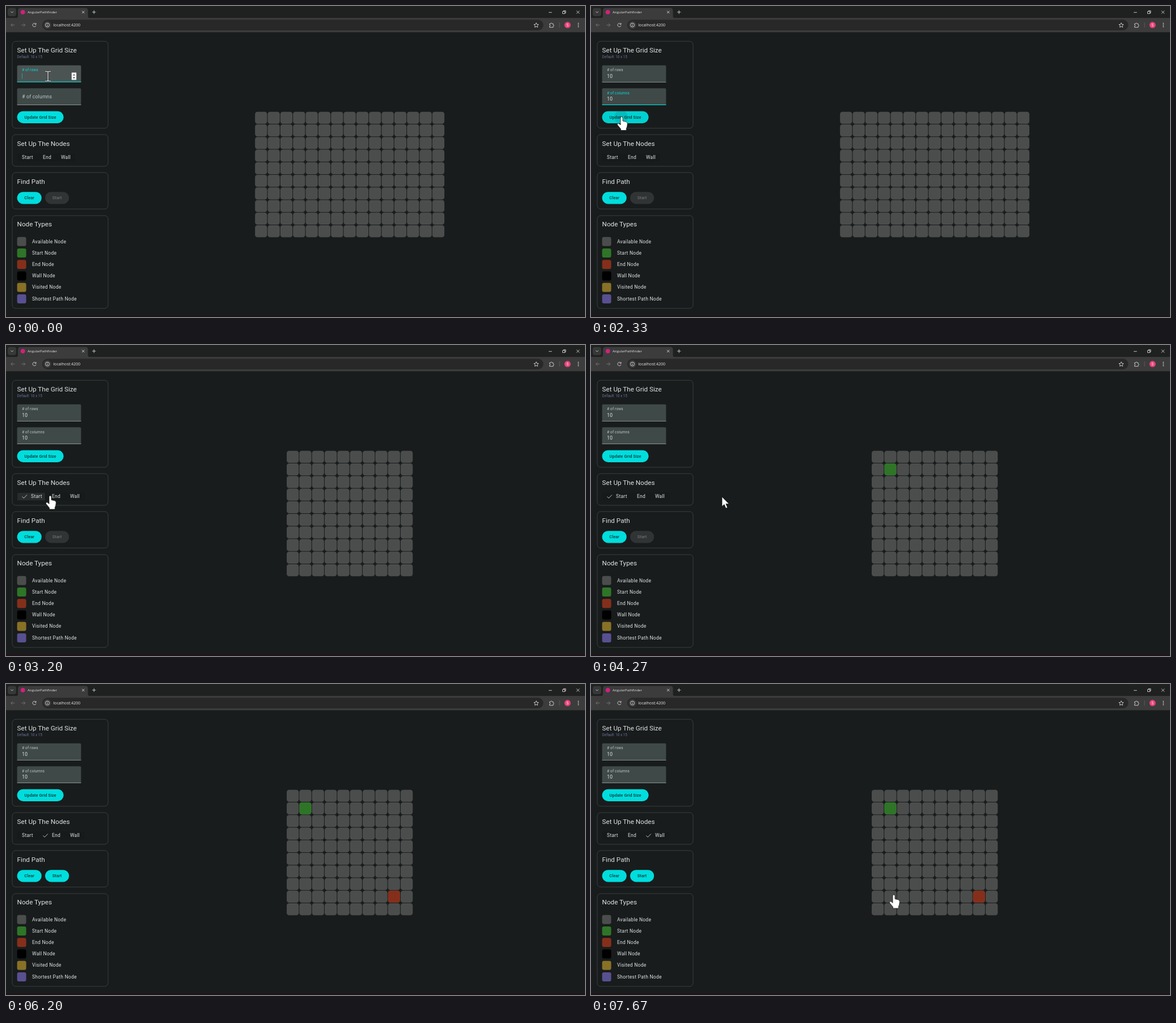
An HTML page that plays this animation: 1021x549 px, repeating every 8 s.

```html
<!DOCTYPE html>
<html lang="en">
<head>
<meta charset="utf-8">
<title>AngularPathfinder</title>
<style>
  html, body { margin: 0; width: 100%; height: 100%; overflow: hidden; background: #191c1c; }
  svg { display: block; width: 100%; height: 100%; }
  text { font-family: Roboto, sans-serif; white-space: pre; }
  .ui { font-family: "Open Sans", sans-serif; }
  .line { fill: none; stroke: #d5d5d5; stroke-width: .9; }
</style>
</head>
<body>
<svg viewBox="0 0 1021 549"><g id="page"></g><g id="live"></g></svg>
<script>
const LOOP = 8000, FPS = 15;
const PRIMARY = '#00dddd', ON_PRIMARY = '#003737', TEXT = '#dfe3e2', MUTED = '#bec9c8';
const NODE = { free: '#4b4d4c', start: '#2e7528', end: '#852f1b', wall: '#000', seen: '#887126', path: '#585090' };

const rect = (x, y, w, h, r, fill, extra = '') =>
  `<rect x="${x}" y="${y}" width="${w}" height="${h}" rx="${r}" fill="${fill}" ${extra}/>`;
const label = (x, y, s, size, fill = TEXT, extra = '') =>
  `<text x="${x}" y="${y}" font-size="${size}" fill="${fill}" ${extra}>${s}</text>`;
const path = (d, extra = 'class="line"') => `<path d="${d}" ${extra}/>`;
const spaced = 'letter-spacing=".266"';
const bold = 'font-weight="500" letter-spacing=".05" text-anchor="middle"';

function browser() {
  return rect(0, 0, 1021, 22, 0, '#1f2020') +
    rect(3, 3.5, 15, 14.5, 4, '#373838') +
    path('M8.5 9.7l2.2 2.2 2.2-2.2') +
    path('M17 21.5q4 0 4-4V8q0-4.5 4.500-4.500H140q4.500 0 4.500 4.500v9.500q0 4 4 4z', 'fill="#3c3c3c"') +
    rect(0, 21, 1021, 25.300, 0, '#3c3c3c') +
    '<circle cx="29.700" cy="10.800" r="3.900" fill="#d3207c"/>' +
    label(38, 13.2, 'AngularPathfinder', 6.1, '#e6e6e6', 'class="ui"') +
    path('M134 8.600l4.400 4.400m0-4.400l-4.400 4.400M152 10.800h6.400m-3.200-3.200v6.400') +
    path('M957 11.300h5.600M1006 8.300l5.200 5.200m0-5.200l-5.200 5.200M981.500 9.700h4v3.800h-4zM983 9.500V8.300h4v4h-1.300') +
    path('M15.300 33.600H8.800m3-3l-3 3 3 3M27.300 33.600h6.500m-3-3l3 3-3 3', 'class="line" style="stroke:#777"') +
    path('M52.600 31.800a3.100 3.100 0 1 0 .4 2.700M53 30v2.400h-2.500') +
    rect(64, 24.3, 883.500, 18.800, 9.4, '#282828') +
    '<circle cx="73" cy="33.600" r="6.600" fill="#3c3c3c"/><circle cx="73" cy="33.600" r="3.500" class="line"/>' +
    path('M73 33v2.500m0-4.200v.9') +
    label(83.3, 36.1, 'localhost:4200', 7.1, '#e8e8e8', 'class="ui"') +
    path('M935 29.700l1.200 2.700 2.900.3-2.200 2 .6 2.900-2.500-1.500-2.500 1.500.6-2.900-2.200-2 2.900-.3z') +
    path('M958.500 31.300h2a1.200 1.200 0 0 1 2.400 0h2v2a1.200 1.200 0 0 1 0 2.400v2h-6.400v-2a1.200 1.200 0 0 0 0-2.400z') +
    rect(975.6, 29, .9, 9, 0, '#5e5e5e') +
    '<circle cx="990.200" cy="33.600" r="5.500" fill="#e8417b"/>' +
    label(990.2, 35.9, 'S', 6.4, '#fff', 'text-anchor="middle"') +
    [30.6, 33.6, 36.6].map(y => `<circle cx="1009.300" cy="${y}" r=".9" fill="#ddd"/>`).join('');
}

const card = (y, h, title, dy) =>
  rect(11, y, 169, h, 6, 'none', 'stroke="#3f4847" stroke-width=".8"') + label(19.6, y + dy, title, 11.7);

function page() {
  const legend = [['Available', 'free'], ['Start', 'start'], ['End', 'end'],
    ['Wall', 'wall'], ['Visited', 'seen'], ['Shortest Path', 'path']];
  return rect(0, 0, 1021, 549, 0, '#191c1c') + browser() +
    card(62.3, 153.5, 'Set Up The Grid Size', 19.500) +
    label(19.6, 92.2, 'Default: 10 x 15', 6.4, '#69719a') +
    card(227, 56, 'Set Up The Nodes', 19.9) +
    card(294, 64.300, 'Find Path', 19.9) +
    rect(19.6, 328.2, 43.200, 21.200, 10.6, PRIMARY) +
    label(41.2, 341.2, 'Clear', 7.45, ON_PRIMARY, bold) +
    card(370, 163.800, 'Node Types', 19.400) +
    legend.map(([name, kind], i) => {
      const y = 407.8 + i * 20.22;
      return rect(19.6, y, 16, 16, 3.2, NODE[kind]) + label(46, y + 10.8, name + ' Node', 8.5, TEXT, spaced);
    }).join('') +
    rect(0, 546.3, 1021, 2.7, 0, '#201419');
}

// Pointer stops: time, x, y, shape (I beam, A arrow, H hand, - hidden)
const STOPS = `0 74 124 I|70 74 124 I|200 75 130 I|270 74 138 A|330 72 144 A|400 72 144 A|470 69 151 I
800 60 160 I|930 60 160 I|1530 55 163 I|1670 55 166 I|1800 57 176 A|1870 66 188 H|2000 74 192 H
2130 54 195 H|2530 54 196 H|2670 47 225 A|2870 46 267 H|3060 50 268 H|3200 78 266 H
3330 135 277 A|3460 240 284 A|3600 400 260 A|3800 535 228 H|3870 549 224 H|4000 534 222 H
4070 520 225 H|4130 440 240 A|4200 330 258 A|4270 231 268 A|4400 150 266 A|4530 125 266 H
4730 117 266 H|4800 117 266 H|5000 90 267 H|5130 90 267 H|5200 97 268 H|5270 180 285 A
5400 420 340 A|5530 620 378 H|5670 691 383 H|5800 688 379 H|5930 686 378 H|6070 686 378 H
6130 430 256 A|6200 430 256 -|6530 38 193 H|6670 70 235 A|6800 112 266 H|6930 114 267 H
7000 130 272 H|7130 300 315 A|7260 470 345 A|7330 526 350 H|7400 580 368 H|7470 597 374 H
7600 545 374 H|7670 534 372 H|8000 534 372 H`.split(/[|\n]/).map(s => {
  const [t, x, y, shape] = s.split(' ');
  return { t: +t, x: +x, y: +y, shape };
});
const OUTLINE = 'fill="#fff" stroke="#111" stroke-width=".7" stroke-linejoin="round"';
const BEAM = 'M-5-8.500h3.200q1.800 0 1.800 1.500V7q0 1.500-1.800 1.500H-5M5-8.500H1.800Q0-8.500 0-7V7q0 1.500 1.800 1.500H5';
const SHAPES = {
  I: path(BEAM, 'fill="none" stroke="#222" stroke-width="2.800"') + path(BEAM, 'fill="none" stroke="#d0d0d0" stroke-width="1.500"'),
  A: path('M0 0V17L4 13.500 6.800 20.200 9.700 19 6.900 12.400H12.300z', OUTLINE),
  H: path('M-2 2Q-2 0 0 0T2 2V7.500L7.500 8.700Q10.500 9.500 10.300 12.500L9.700 17Q9.300 19 8.300 20.500V24H-1.500V21.500L-7.300 14.500Q-8.300 12.800-6.800 12Q-5 11.300-3.500 13L-2 14.500z', OUTLINE),
  '-': ''
};

function pointer(t) {
  const i = STOPS.findLastIndex(s => s.t <= t), a = STOPS[i], b = STOPS[i + 1] || a;
  const k = a.shape === '-' || b.shape === '-' ? 0 : (t - a.t) / (b.t - a.t || 1);
  return `<g transform="translate(${a.x + (b.x - a.x) * k} ${a.y + (b.y - a.y) * k})">${SHAPES[a.shape]}</g>`;
}

function field(y, name, { value, focus, float, hover, caret }) {
  const mix = `color-mix(in srgb, ${PRIMARY} ${focus * 100}%, ${MUTED})`;
  const thick = focus > 0 ? 1.1 : .6;
  let out = path(`M19.600 ${y + 29.8}V${y + 2}q0-2 2-2H130.400q2 0 2 2V${y + 29.8}z`, `fill="${hover ? '#4b5453' : '#3f4948'}"`) +
    rect(19.6, y + 29.8 - thick, 112.8, thick, 0, mix) +
    `<g transform="translate(28.200 ${y + 18 - 7.7 * float}) scale(${1 - .25 * float})">${label(0, 0, name, 8.5, mix, spaced)}</g>` +
    label(28.2, y + 21.9, value, 8.5, TEXT, spaced);
  if (caret) out += rect(28.2 + value.length * 5.05, y + 14, .6, 9.6, 0, PRIMARY);
  if (hover) {
    out += rect(115.7, y + 12.8, 8.400, 13, .5, '#f4f4f4') +
      path(`M118 ${y + 17.6}l1.900-2.200 1.900 2.200zM118 ${y + 21}l1.900 2.200 1.900-2.200z`, 'fill="#333"');
  }
  return out;
}

const typed = (t, first, second) => t < first ? '' : t < second ? '1' : '10';

function render(t) {
  const ramp = (a, b) => Math.min(1, Math.max(0, (t - a) / (b - a)));
  const within = (a, b) => t >= a && t < b;

  let out = field(104.8, '# of rows', {
    value: typed(t, 130, 200), focus: 1 - ramp(1460, 1670) ** 2, float: 1,
    hover: t < 270, caret: t < 600
  }) + field(145.2, '# of columns', {
    value: typed(t, 1870, 2000), focus: ramp(1530, 1670) - ramp(2330, 2530), float: ramp(1530, 1730),
    hover: within(470, 1800), caret: within(1730, 2130)
  });

  const onButton = within(1870, 2600) || within(6530, 6600);
  out += rect(19.6, 185.700, 82, 21.200, 10.6, PRIMARY);
  if (onButton) out += rect(19.6, 185.700, 82, 21.200, 10.6, ON_PRIMARY, 'opacity=".08"');
  if (within(2330, 2800)) {
    out += `<clipPath id="pill">${rect(19.6, 185.700, 82, 21.200, 10.6, '#000')}</clipPath>` +
      `<circle cx="53" cy="196" r="${12 + 45 * ramp(2330, 2600)}" fill="${ON_PRIMARY}" opacity="${.12 * (1 - ramp(2530, 2800))}" clip-path="url(#pill)"/>`;
  }
  out += label(60.6, 198.6, 'Update Grid Size', 7.45, ON_PRIMARY, bold);

  // Toggle group: the chosen button grows by the width of its check mark
  const pick = [ramp(2870, 3000) - ramp(5060, 5200), ramp(5060, 5200) - ramp(6800, 6930), ramp(6800, 6930)];
  const hovers = [within(2800, 3130) ? 1 : within(3130, 3330) ? 1 - ramp(3130, 3330) ** 2 : 0,
    within(4930, 5270) ? 1 : 0, within(4470, 4930) || within(6740, 7070) ? 1 : 0];
  const widths = [36.800, 32, 33];
  const total = widths.reduce((a, b) => a + b) + 16 * pick.reduce((a, b) => a + b);
  out += rect(19.6, 260.800, total, 13.600, 1, '#171a1a');
  let x = 20;
  ['Start', 'End', 'Wall'].forEach((name, i) => {
    const w = widths[i] + 16 * pick[i];
    if (hovers[i]) out += rect(x, 261, w - 4, 13.2, .5, '#e0e3e2', `opacity="${.1 * hovers[i]}"`);
    if (pick[i] > 0) out += path(`M${x + 8.5} 267.500l2.800 2.900 5.700-5.900`, `class="line" opacity="${pick[i]}"`);
    out += label(x + 8.1 + 16 * pick[i], 270.2, name, 8.5, TEXT, spaced);
    x += w;
  });

  const ready = t >= 6070;
  out += rect(69, 328.2, 42.200, 21.200, 10.6, ready ? PRIMARY : '#313434') +
    label(90.1, 341.2, 'Start', 7.45, ready ? ON_PRIMARY : '#6b6f6e', bold);

  const cols = within(0, 2400) ? 15 : 10, pitch = 22.33, size = 21.27;
  const left = 606.1 - (cols * pitch - 1.06) / 2;
  const cell = (c, r, fill, extra) => rect(left + c * pitch, 186.8 + r * pitch * .9965, size, size, 4.2, fill, extra);
  for (let i = 0; i < cols * 10; i++) out += cell(i % cols, Math.floor(i / cols), NODE.free);
  out += cell(1, 1, NODE.start, `opacity="${ramp(3930, 4130)}"`);
  out += cell(8, 8, NODE.end, `opacity="${ramp(6000, 6130)}"`);
  return out + pointer(t);
}

document.getElementById('page').innerHTML = page();
const live = document.getElementById('live');
let shown = -1;
function tick() {
  const step = Math.floor(performance.now() % LOOP / 1000 * FPS + .05);
  if (step !== shown) {
    shown = step;
    live.innerHTML = render(Math.round(step * 100 / FPS) * 10);
  }
  requestAnimationFrame(tick);
}
tick();
</script>
</body>
</html>
```
